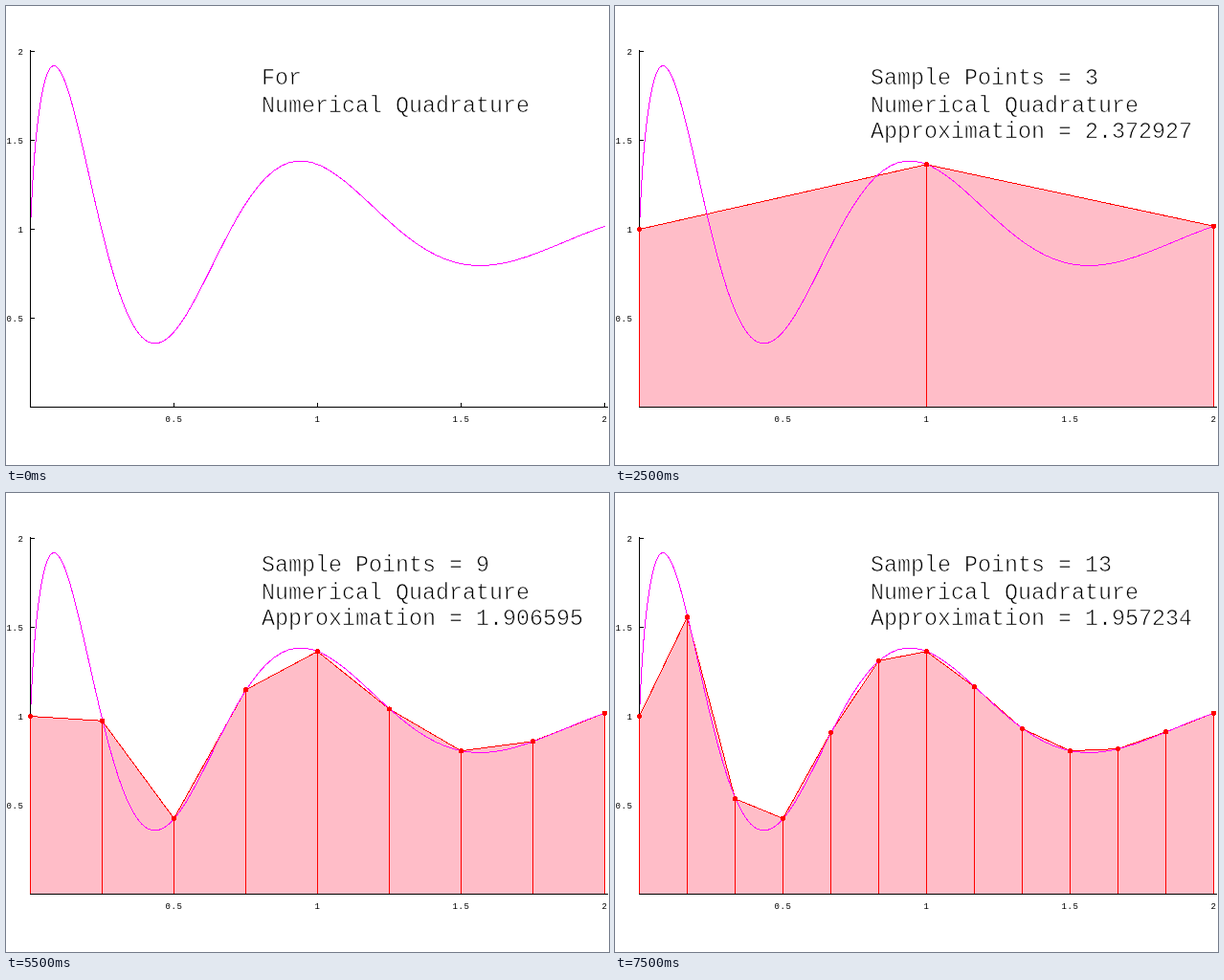
Write an HTML page that moves like this. It is 630 by 480 pixels and loops after 8000 ms.

```html
<!DOCTYPE html>
<html lang="en">
<head>
<meta charset="utf-8">
<title>Trapezoidal rule</title>
<style>
  html, body { margin: 0; width: 100%; height: 100%; overflow: hidden; background: #fff; }
  svg { display: block; width: 630px; height: 480px; shape-rendering: crispEdges; }
  /* the white outline thins the strokes of the letters */
  text { font: 23.33px "Liberation Mono", monospace; white-space: pre; stroke: #fff; stroke-width: .7px; }
  .tick { font-size: 9px; letter-spacing: .6px; stroke: none; }
  path { fill: none; stroke-width: 1; }
</style>
</head>
<body>
<svg viewBox="0 0 630 480">
  <path id="axes" stroke="#000"/>
  <path id="area" style="fill:#ffbdc8"/>
  <path id="bars" stroke="#f00"/>
  <path id="tops" stroke="#f00"/>
  <path id="curve" stroke="#f0f"/>
  <g id="dots" fill="#f00"></g>
  <g id="labels"></g>
  <g id="caption"></g>
</svg>
<script>
const $ = id => document.getElementById(id);
const f = x => 1 + Math.exp(-x) * Math.sin(8 * Math.cbrt(x * x));
const X = x => 25.5 + 300 * x;
const Y = y => 419.5 - 186 * y;
const polyline = pts => 'M' + pts.map(p => p.map(v => v.toFixed(2)).join()).join('L');

// start time in ms, number of sample points
const steps = [[0, 0], [500, 2], [2500, 3], [3500, 5], [4500, 7], [5500, 9], [6500, 11], [7500, 13]];

function drawPlot() {
  const pts = [];
  for (let i = 2; i <= 100; i++) {
    const x = 2 * (i / 100) ** 2;
    pts.push([X(x) + .5, Y(f(x))]);
  }
  $('curve').setAttribute('d', polyline(pts));

  let d = 'M25.5,46V419.5H629', labels = '';
  for (let v = 0.5; v <= 2; v += 0.5) {
    d += `M${X(v)},415V419M26,${Y(v)}H30`;
    labels += `<text class="tick" text-anchor="middle" x="${X(v)}" y="435">${v}</text>` +
      `<text class="tick" text-anchor="end" x="18.6" y="${Y(v) + 3}">${v}</text>`;
  }
  $('axes').setAttribute('d', d);
  $('labels').innerHTML = labels;
}

function drawStep(n) {
  const xs = Array.from({ length: n }, (_, i) => 2 * i / (n - 1));
  const pts = xs.map(x => [X(x), Y(f(x))]);
  const lines = ['For', 'Numerical Quadrature'];
  const base = Y(0) - .5;
  let top = '', area = '', bars = '';
  if (n) {
    const sum = xs.reduce((s, x) => s + f(x), 0) - (f(0) + f(2)) / 2;
    lines[0] = `Sample Points = ${n}`;
    lines.push(`Approximation = ${(sum * 2 / (n - 1)).toFixed(6)}`);
    top = polyline(pts);
    area = top + `V${base}H${X(0)}Z`;
    bars = pts.map(([x, y]) => `M${x},${y}V${base}`).join('');
  }
  $('tops').setAttribute('d', top);
  $('area').setAttribute('d', area);
  $('bars').setAttribute('d', bars);
  $('dots').innerHTML = pts.map(([x, y]) => `<circle cx="${x}" cy="${y}" r="2.6"/>`).join('');
  $('caption').innerHTML = lines.map((s, i) =>
    `<text x="267" y="${[82, 110.5, 138][i]}">${s}</text>`).join('');
}

let shown = -1;
function frame() {
  const t = performance.now() % 8000;
  const n = steps.filter(s => s[0] <= t).pop()[1];
  if (n !== shown) drawStep(shown = n);
  requestAnimationFrame(frame);
}
drawPlot();
frame();
</script>
</body>
</html>
```
